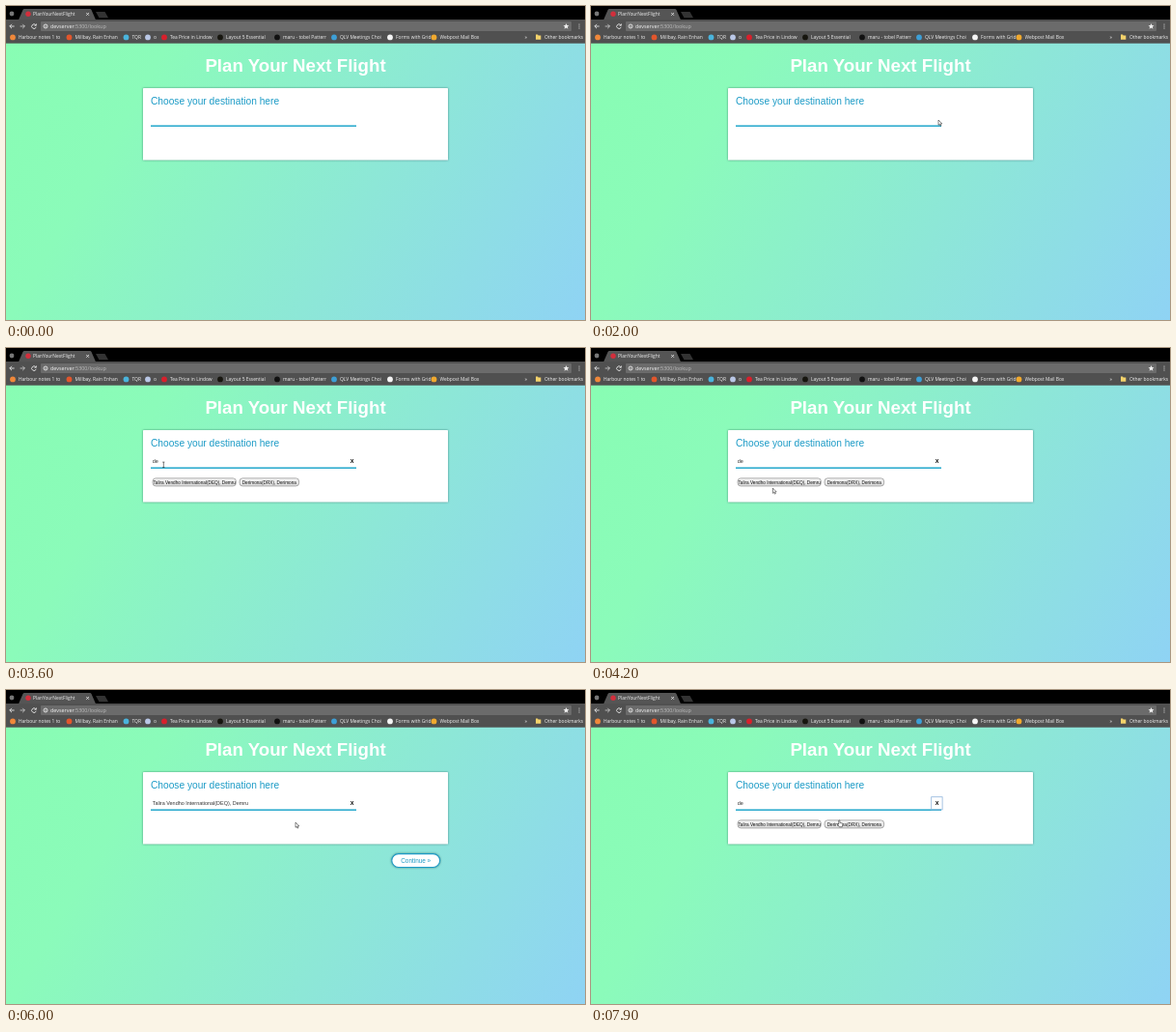
Recreate the animation shown at these times as an HTML page. Size 600x325 px, loop 8 s.

```html
<!DOCTYPE html>
<html lang="en">
<head>
<meta charset="utf-8">
<title>Destination search</title>
<style>
  html, body { margin: 0; width: 100%; height: 100%; overflow: hidden; background: #000; }
  svg { display: block; width: 100vw; height: 100vh; }
  text { font-family: "Liberation Sans", Arial, sans-serif; white-space: pre; }
  .chrome text { font-family: "Open Sans", "Noto Sans", sans-serif; font-size: 4.9px; fill: #f2f2f2; }
  .line { fill: none; stroke: #e6e6e6; stroke-width: .9; }
  .accent { fill: #1c9bc6; }
  .card { filter: drop-shadow(0 .6px 1.3px rgba(0, 40, 50, .5)); }
</style>
</head>
<body>
<svg viewBox="0 0 600 325" preserveAspectRatio="none">
  <defs>
    <linearGradient id="sky" gradientUnits="userSpaceOnUse" x1="13" y1="16.5" x2="587" y2="347.5">
      <stop offset="0" stop-color="#88fdb3"/>
      <stop offset=".22" stop-color="#8bfbba"/>
      <stop offset="1" stop-color="#8fd3f4"/>
    </linearGradient>
    <linearGradient id="pill" x2="0" y2="1">
      <stop offset="0" stop-color="#f6f6f6"/>
      <stop offset="1" stop-color="#dcdcdc"/>
    </linearGradient>
  </defs>

  <rect y="38" width="600" height="287" fill="url(#sky)"/>

  <g class="chrome">
    <rect width="600" height="14.5"/>
    <rect y="14" width="600" height="24.7" fill="#505050"/>
    <path d="M13 14.2 L17.5 4 Q18 3 19 3 H87 Q88 3 88.5 4 L93 14.2Z" fill="#555"/>
    <path d="M93 6 H102.5 L106 12.2 H96.5Z" fill="#333"/>
    <circle cx="6" cy="8" r="2.4" fill="#777"/>
    <circle cx="23" cy="8.3" r="2.7" fill="#d32f3c"/>
    <text x="28" y="10.3">PlanYourNextFlight</text>
    <path class="line" d="M83.3 7.1 l2.6 2.6 m0 -2.6 l-2.6 2.6" stroke-width=".7"/>
    <rect x="36" y="16" width="550" height="10" rx="1" fill="#6b6b6b"/>
    <path class="line" d="M8.6 21 H3.8 M6 18.8 L3.8 21 L6 23.2"/>
    <path class="line" d="M14.6 21 H19.4 M17.2 18.8 L19.4 21 L17.2 23.2" opacity=".75"/>
    <path class="line" d="M30.8 19.7 A2.3 2.3 0 1 0 31.2 21.8 M31.3 18.4 V20.2 H29.5"/>
    <circle class="line" cx="41" cy="21" r="2" stroke-width=".6"/>
    <path class="line" d="M41 20.6 V22.2 M41 19.6 V20" stroke-width=".6"/>
    <text x="46" y="23" style="font-size:5.4px">devserver<tspan fill="#bdbdbd">:5300/lookup</tspan></text>
    <path d="M580.5 18 l.9 2 2.1 .2 -1.6 1.4 .5 2.1 -1.9 -1.1 -1.9 1.1 .5 -2.1 -1.6 -1.4 2.1 -.2Z" fill="#eee"/>
    <g fill="#e6e6e6"><circle cx="594" cy="19" r=".6"/><circle cx="594" cy="21" r=".6"/><circle cx="594" cy="23" r=".6"/></g>
    <g id="bookmarks"></g>
    <text x="537.5" y="34">»</text>
    <path d="M549 29.6 h2 l.7 .8 h2.6 v4.4 h-5.3Z" fill="#f3d26b"/>
    <text x="558" y="34.2">Other bookmarks</text>
  </g>

  <text x="300" y="68.3" text-anchor="middle" font-size="18.7" font-weight="700" fill="#fff">Plan Your Next Flight</text>
  <rect class="card" x="142" y="85" width="316" height="74.5" rx=".6" fill="#fff"/>
  <text class="accent" x="150" y="102" font-size="10.2">Choose your destination here</text>
  <rect x="150" y="123.4" width="213" height="1.5" fill="#22a7cb"/>
  <text id="query" x="151.7" y="119" font-size="5.46" fill="#333"></text>
  <rect id="ring" x="352.7" y="110.7" width="11.4" height="13.2" fill="none" stroke="#8fb4dc" stroke-width=".8"/>
  <text id="clear" x="358.5" y="119" text-anchor="middle" font-size="5.6" font-weight="700">X</text>
  <g id="results"></g>
  <g id="next">
    <rect class="card" x="399.8" y="169.6" width="49.8" height="13.9" rx="6.95" fill="#fff" stroke="#1c9bc6" stroke-width="1.1"/>
    <text class="accent" x="424.7" y="178.8" text-anchor="middle" font-size="6.4">Continue »</text>
  </g>

  <g id="pointer">
    <path data-kind="arrow" d="M0 0 V5.3 L1.2 4.2 L2 6.1 L2.9 5.7 L2.1 3.9 H3.8Z" fill="#fff" stroke="#222" stroke-width=".55"/>
    <path data-kind="beam" d="M-1.1 -2.7 H1.1 M0 -2.7 V2.7 M-1.1 2.7 H1.1" fill="none" stroke="#222" stroke-width=".6"/>
    <path data-kind="hand" d="M-.6 .3 Q0 -.4 .6 .3 V2.6 L3.1 3.2 Q3.7 3.4 3.6 4.2 L3 6.9 H0 L-1.9 4.2 Q-1.6 3.4 -.6 4.2Z" fill="#fff" stroke="#222" stroke-width=".55"/>
  </g>
</svg>

<script>
const LOOP = 8000, TICK = 100;
const byId = id => document.getElementById(id);

// icon x, icon colour, label
const bookmarks = [
  [7, '#f0883a', 'Harbour notes 1 to'],
  [65.5, '#e2562c', 'Millbay, Rain Enhan'],
  [124.5, '#4ab4dc', 'TQR'],
  [147, '#b9c7e6', 'o'],
  [164, '#d8202c', 'Tea Price in Lindow'],
  [222, '#17160f', 'Layout 5 Essential'],
  [281, '#111', 'maru - tobel Pattern'],
  [340, '#3d9fd6', 'QLV Meetings Choi'],
  [398, '#f4f4f4', 'Forms with Grid'],
  [443.5, '#f0a92e', 'Webpost Mail Box']
];
byId('bookmarks').innerHTML = bookmarks.map(([x, colour, label]) => `
  <circle cx="${x}" cy="32.4" r="2.9" fill="${colour}"/>
  <svg x="${x + 6}" y="27" width="45" height="11"><text y="7.2">${label}</text></svg>`).join('');

const airport = {
  main: 'Talira Vendho International(DEQ), Demru',
  short: 'DOV(DOV), Dov El Morune',
  lord: 'Lord Perun International(DNW), Dunvam',
  twin: 'Derimona(DRX), Derimona'
};

// left, width, label
const resultSets = {
  d: [[152, 62.5, airport.short], [218.6, 86.4, airport.main], [308.5, 93.6, airport.lord]],
  de: [[152, 86.4, airport.main], [242, 61.6, airport.twin]]
};

const states = [
  { at: 0, query: '' },
  { at: 2700, query: 'd' },
  { at: 3600, query: 'de' },
  { at: 5100, query: airport.main, next: true },
  { at: 6900, query: airport.main, next: true, ring: true },
  { at: 7100, query: 'de', ring: true }
];

// time, x, y, shape from this time on
const path = [
  [1700, 600, 112, 'arrow'],
  [2000, 360, 118, 'arrow'],
  [2100, 270, 120, 'beam'],
  [2400, 163.3, 120.8, 'beam'],
  [3700, 163.3, 120.8, 'beam'],
  [3900, 174, 131, 'arrow'],
  [4200, 188.4, 145, 'arrow'],
  [4400, 200, 144.5, 'arrow'],
  [4600, 209, 141, 'hand'],
  [4900, 190, 137.5, 'hand'],
  [5100, 190, 137.5, 'arrow'],
  [5500, 190, 137.5, 'arrow'],
  [6000, 300, 137, 'arrow'],
  [6200, 371, 128, 'arrow'],
  [6400, 362.5, 116.5, 'hand'],
  [6700, 361.3, 115.3, 'hand'],
  [7100, 361.3, 115.3, 'hand'],
  [7300, 335, 122, 'beam'],
  [7500, 295, 130, 'arrow'],
  [7700, 262, 134.5, 'hand'],
  [7900, 257.3, 134.8, 'hand']
];

const latest = (list, t, time) => list.filter(item => time(item) <= t).pop();
const show = (element, on) => element.style.display = on ? '' : 'none';
const pointer = byId('pointer');
let current;

function drawState(state) {
  byId('query').textContent = state.query;
  show(byId('clear'), state.query);
  show(byId('ring'), state.ring);
  show(byId('next'), state.next);
  byId('results').innerHTML = (resultSets[state.query] || []).map(([x, width, label]) => `
    <rect x="${x}" y="134.8" width="${width}" height="8.1" rx="3.2" fill="url(#pill)" stroke="#858585" stroke-width=".65"/>
    <text x="${x + width / 2}" y="140.5" text-anchor="middle" font-size="4.7" fill="#111">${label}</text>`).join('');
}

function drawPointer(t) {
  const from = latest(path, t, step => step[0]);
  show(pointer, from);
  if (!from) return;
  const to = path[path.indexOf(from) + 1] || from;
  const part = to === from ? 0 : (t - from[0]) / (to[0] - from[0]);
  const [x, y] = [1, 2].map(i => from[i] + (to[i] - from[i]) * part);
  pointer.setAttribute('transform', `translate(${x} ${y})`);
  for (const shape of pointer.children) show(shape, shape.dataset.kind === from[3]);
}

function render(now) {
  const t = Math.floor(now % LOOP / TICK) * TICK;
  const state = latest(states, t, item => item.at);
  if (state !== current) drawState(current = state);
  drawPointer(t);
}

const start = performance.now();
function frame() {
  render(performance.now() - start);
  requestAnimationFrame(frame);
}
frame();
</script>
</body>
</html>
```
